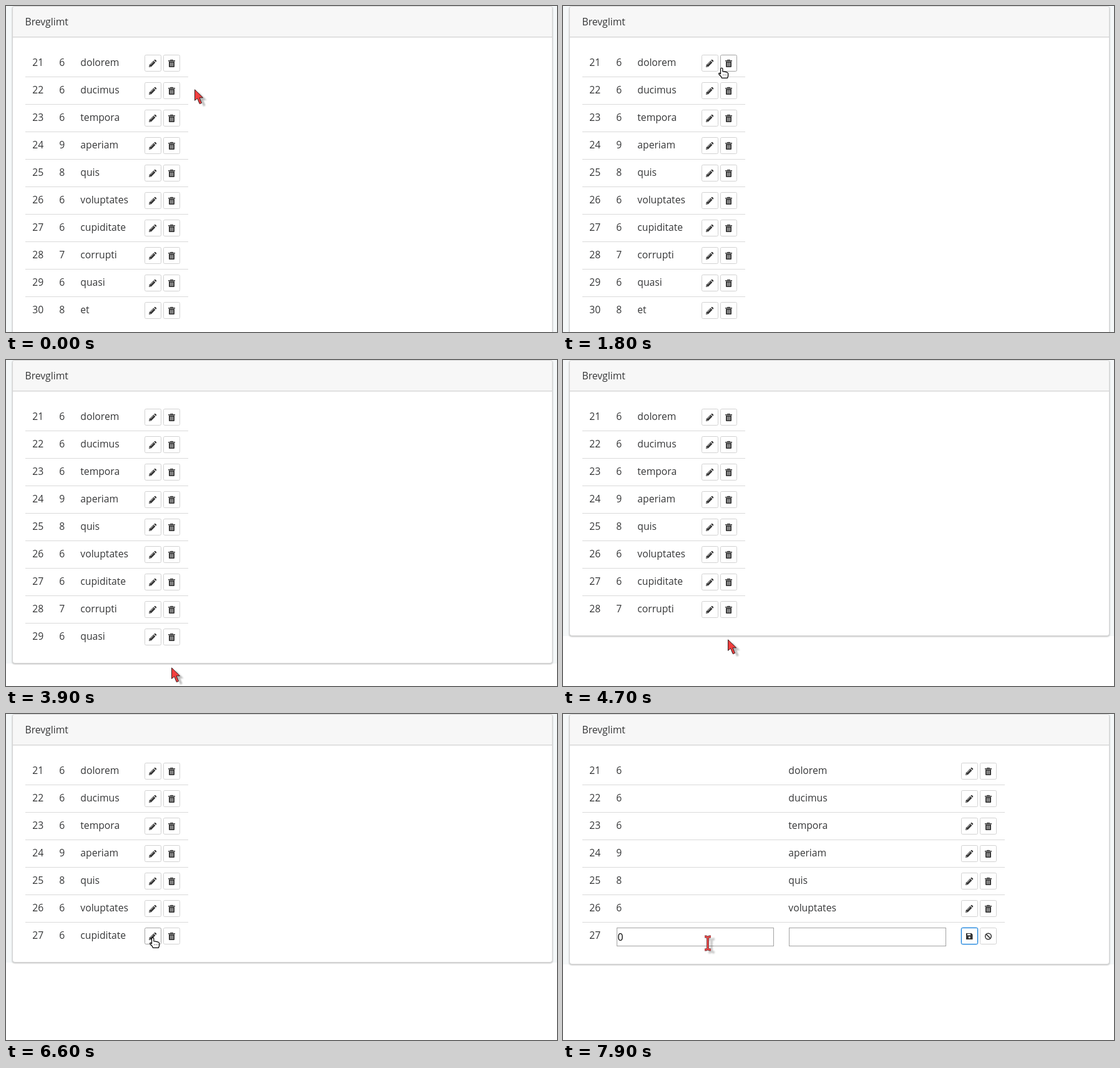
An HTML page that plays this animation: 883x522 px, repeating every 8000 ms.

```html
<!DOCTYPE html>
<html lang="en">
<head>
<meta charset="utf-8">
<title>Editable table</title>
<style>
  html, body { margin: 0; width: 100%; height: 100%; overflow: hidden; background: #fff; }
  svg { display: block; }
  text { font: 15.7px "Open Sans", "Noto Sans", sans-serif; fill: #363738; }
  .btn { fill: #fff; stroke: #d2d2d2; }
  .btn.hover { stroke: #a3a3a3; }
  .btn.focus { stroke: #0275d8; filter: drop-shadow(0 0 1px #0275d888); }
  .field { fill: #fff; stroke: #a3a3a3; }
  .line { stroke: #dadada; }
</style>
</head>
<body>
<svg width="883" height="522" viewBox="0 0 883 522">
  <defs>
    <filter id="soft" x="-50%" y="-50%" width="200%" height="200%"><feGaussianBlur stdDeviation="1"/></filter>
    <g id="pencil" fill="#333">
      <path d="M7 20L7.8 16.2L14.4 9.6L17.4 12.6L10.8 19.2Z"/>
      <path d="M15.2 8.8L16.2 7.9Q16.8 7.4 17.4 8L19 9.6Q19.6 10.2 19 10.8L18.1 11.8Z"/>
      <path d="M9.5 16L14.4 11.1M8 17.6L9.4 19" stroke="#fff" stroke-width=".8"/>
    </g>
    <g id="trash">
      <path d="M11.5 9V8.3H15.5V9" fill="none" stroke="#333"/>
      <path d="M8 9H19V10.5H8ZM9 11H18V19Q18 20 17 20H10Q9 20 9 19Z" fill="#333"/>
      <path d="M11.5 12.5V18.5M13.5 12.5V18.5M15.5 12.5V18.5" stroke="#ddd" stroke-width=".9"/>
    </g>
    <g id="save">
      <path d="M8 9H16.5L18.5 11V19H8Z" fill="#333"/>
      <path d="M10 10H15V12.3H10Z" fill="#fff"/>
      <circle cx="13.3" cy="15.8" r="1.5" fill="#fff"/>
    </g>
    <g id="cancel" fill="none" stroke="#333" stroke-width="1.5">
      <circle cx="13.5" cy="14" r="4.8"/><path d="M10.1 10.6L16.9 17.4"/>
    </g>
    <path id="arrowShape" d="M.5 .8V18.3L4.7 14.9L8.4 23.7L11.6 22.3L8 13.8H13.5Z"/>
    <path id="beamShape" d="M-5-10.5H-2.5L0-9L2.5-10.5H5M0-9V9M-5 10.5H-2.5L0 9L2.5 10.5H5" fill="none"/>
  </defs>

  <rect id="page" width="883" fill="#f5f8f9"/>
  <rect id="shade" x="10" y="1" width="866" rx="4" fill="#0004" filter="url(#soft)"/>
  <rect id="card" x="10.5" y=".5" width="865" rx="3.5" fill="#fff" stroke="#d3d3d3"/>
  <path d="M11 49V4Q11 1 14 1H872Q875 1 875 4V49Z" fill="#f7f7f7"/>
  <path d="M11 49.5H875" stroke="#d6d6d6"/>
  <path d="M11 50.5H875" stroke="#eee"/>
  <text x="30.5" y="31">Brevglimt</text>
  <g id="table"></g>
  <g id="form">
    <rect class="field" x="86.5" y="342.5" width="251" height="29"/>
    <rect class="field" x="362.5" y="342.5" width="251" height="29"/>
    <text x="87.5" y="363" style="fill:#000">0</text>
  </g>

  <g id="cursor">
    <g id="arrow">
      <use href="#arrowShape" x="6" y="4" fill="#0004" filter="url(#soft)"/>
      <use href="#arrowShape" fill="#f33e3e" stroke="#3c2224"/>
    </g>
    <g id="hand" transform="translate(-.8 .8)">
      <path d="M-1.7 10V2Q-1.7 .5 0 .5T1.7 2V6L4.5 6.4L8.7 7.4Q10.5 8 10.5 9.6V13L9.3 16.5H.2L-.9 14L-4 11Q-5.2 9-3.6 8.5Z"
        fill="#fff" stroke="#000" stroke-width="1.2" stroke-linejoin="round"/>
      <path d="M2.2 11.5H9" stroke="#000" stroke-dasharray="1 2"/>
    </g>
    <g id="beam">
      <use href="#beamShape" x="6" y="4" stroke="#0003" stroke-width="4" filter="url(#soft)"/>
      <use href="#beamShape" stroke="#684044" stroke-width="4"/>
      <use href="#beamShape" stroke="#f04848" stroke-width="2.2"/>
    </g>
  </g>
</svg>
<script>
const LOOP = 8000, STEP = 100, PITCH = 44, BUTTON = 27;
const FIRST_DELETE = 3900, DELETE_GAP = 800, DELETIONS = 3, EDIT_AT = 7300;
const ROWS = ["6 dolorem", "6 ducimus", "6 tempora", "9 aperiam", "8 quis",
  "6 voluptates", "6 cupiditate", "7 corrupti", "6 quasi", "8 et"];
const HOME = [302, 133];
const MOVES = [
  { from: 800, to: 1700, x: 255, y: 98 },
  { from: 1800, to: 2400, x: 274, y: 378 },
  { from: 2600, to: 2700, x: 267, y: 436 },
  { from: 2700, to: 3400, x: 260, y: 491 },
  { from: 3500, to: 3700, x: 265, y: 492 },
  { from: 3900, to: 4500, x: 264, y: 447 },
  { from: 4700, to: 5300, x: 263, y: 403 },
  { from: 6000, to: 6600, x: 236, y: 357 },
  { from: 7200, to: 7900, x: 232, y: 367 }
];

const $ = id => document.getElementById(id);
const show = (el, on) => el.setAttribute("display", on ? "inline" : "none");
const clamp = (v, lo, hi) => Math.min(hi, Math.max(lo, v));
const ease = p => p * p * (3 - 2 * p);

function make(parent, tag, attrs, text = "") {
  const el = document.createElementNS("http://www.w3.org/2000/svg", tag);
  for (const key in attrs) el.setAttribute(key, attrs[key]);
  el.textContent = text;
  return parent.appendChild(el);
}

function makeButton(parent, x, icon) {
  const g = make(parent, "g", { transform: `translate(${x} 78)` });
  const box = make(g, "rect", { class: "btn", x: .5, y: .5, width: BUTTON - 1, height: BUTTON - 1, rx: 2 });
  return { box, icon: make(g, "use", { href: "#" + icon }) };
}

const rows = ROWS.map((entry, i) => {
  const [number, name] = entry.split(" ");
  const g = make($("table"), "g", { transform: `translate(0 ${i * PITCH})` });
  const line = make(g, "path", { class: "line" });
  make(g, "text", { x: 42.3, y: 96 }, String(21 + i));
  const amount = make(g, "text", { x: 85.3, y: 96 }, number);
  const label = make(g, "text", { y: 96 }, name);
  const tools = make(g, "g", {});
  return { g, line, amount, label, tools,
    edit: makeButton(tools, 222, "pencil"), drop: makeButton(tools, 252, "trash") };
});

function pointerAt(t) {
  let [x, y] = HOME;
  for (const m of MOVES) {
    const f = ease(clamp((t - m.from) / (m.to - m.from), 0, 1));
    x += (m.x - x) * f;
    y += (m.y - y) * f;
  }
  return [x, y];
}

function draw(t) {
  const editing = t >= EDIT_AT;
  const deleted = clamp(Math.floor((t - FIRST_DELETE) / DELETE_GAP) + 1, 0, DELETIONS);
  const count = ROWS.length - deleted;
  const bottom = 90 + count * PITCH + (editing ? 3 : 0);
  const [px, py] = pointerAt(t);
  let hovering = false;

  $("page").setAttribute("height", bottom);
  $("card").setAttribute("height", bottom - 1);
  $("shade").setAttribute("height", bottom);

  rows.forEach((row, i) => {
    const open = editing && i === count - 1;
    const top = 78 + i * PITCH;
    const within = (v, start) => v >= start && v < start + BUTTON;
    const over = x => !editing && i < count && within(px, x) && within(py, top);
    const onEdit = over(222), onDrop = over(252);
    hovering = hovering || onEdit || onDrop;

    show(row.g, i < count);
    show(row.line, i < count - 1);
    show(row.amount, !open);
    show(row.label, !open);
    row.line.setAttribute("d", `M31 113.5H${editing ? 708 : 292}`);
    row.label.setAttribute("x", editing ? 361.3 : 119.3);
    row.tools.setAttribute("transform", `translate(${editing ? 416 : 0} 0)`);
    row.edit.box.setAttribute("class", open ? "btn focus" : onEdit ? "btn hover" : "btn");
    row.drop.box.setAttribute("class", onDrop ? "btn hover" : "btn");
    row.edit.icon.setAttribute("href", open ? "#save" : "#pencil");
    row.drop.icon.setAttribute("href", open ? "#cancel" : "#trash");
  });

  show($("form"), editing);
  show($("beam"), editing);
  show($("hand"), hovering);
  show($("arrow"), !editing && !hovering);
  $("cursor").setAttribute("transform", `translate(${px} ${py})`);
}

const start = performance.now();
function tick() {
  const t = (performance.now() - start) % LOOP;
  draw(Math.floor(t / STEP) * STEP);
  requestAnimationFrame(tick);
}
tick();
</script>
</body>
</html>
```
